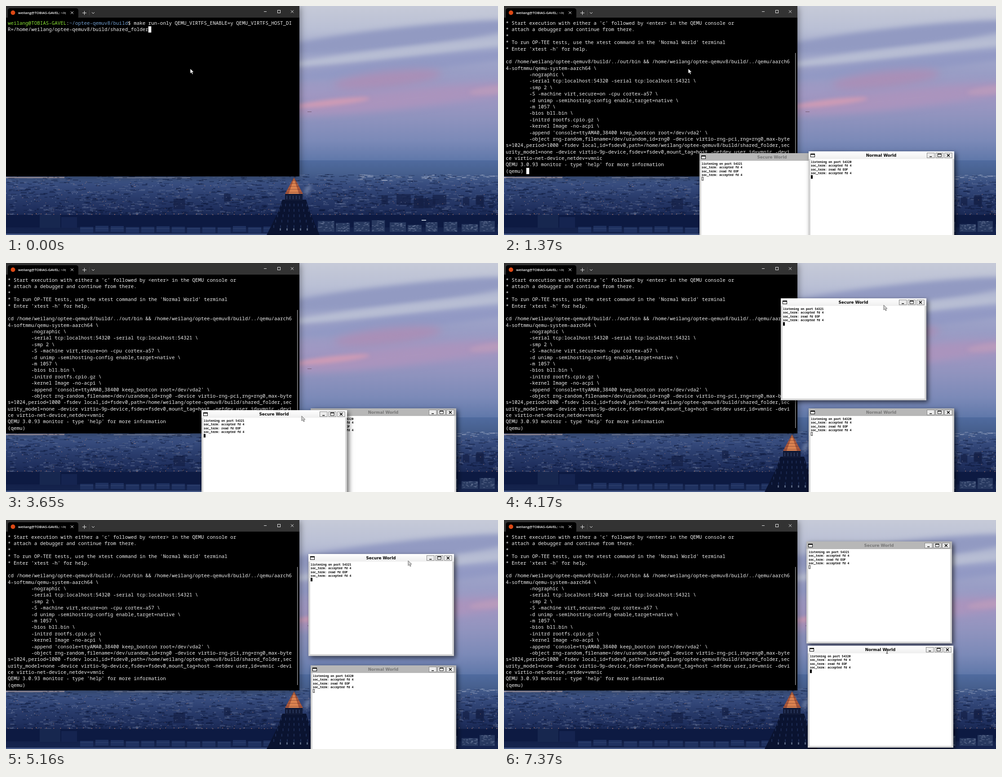
These frames come from a looping animation (1095x512 px, 8 s). An HTML page with a canvas:

```html
<!DOCTYPE html>
<html lang="en">
<head>
<meta charset="utf-8">
<title>Terminal windows</title>
<style>
  html, body { margin: 0; width: 100%; height: 100%; overflow: hidden; background: #000; }
  canvas { display: block; width: 1095px; height: 512px; }
</style>
</head>
<body>
<canvas id="stage" width="1095" height="512"></canvas>
<script>
const W = 1095, H = 512, LOOP = 8000, TICK = 140;
const ctx = document.getElementById('stage').getContext('2d');

const MONO = '10.86px "Noto Sans Mono", monospace';
const TINY = '600 6.55px "Noto Sans Mono", monospace';
const TITLE = 'bold 8.75px "DejaVu Sans", sans-serif';
const TAB = '600 7.9px "Open Sans", sans-serif';
const CELL = 6.517, ROW = 14.385;

const USER = 'weilang', HOST = 'TOBIAS-GAVEL';
const HOME = `/home/${USER}/optee-qemuv8/build`;

const OUTPUT = `* Start execution with either a 'c' followed by <enter> in the QEMU console or
* attach a debugger and continue from there.
*
* To run OP-TEE tests, use the xtest command in the 'Normal World' terminal
* Enter 'xtest -h' for help.

cd ${HOME}/../out/bin && ${HOME}/../qemu/aarch6
4-softmmu/qemu-system-aarch64 \\
        -nographic \\
        -serial tcp:localhost:54320 -serial tcp:localhost:54321 \\
        -smp 2 \\
        -S -machine virt,secure=on -cpu cortex-a57 \\
        -d unimp -semihosting-config enable,target=native \\
        -m 1057 \\
        -bios bl1.bin \\
        -initrd rootfs.cpio.gz \\
        -kernel Image -no-acpi \\
        -append 'console=ttyAMA0,38400 keep_bootcon root=/dev/vda2' \\
        -object rng-random,filename=/dev/urandom,id=rng0 -device virtio-rng-pci,rng=rng0,max-byte
s=1024,period=1000 -fsdev local,id=fsdev0,path=${HOME}/shared_folder,sec
urity_model=none -device virtio-9p-device,fsdev=fsdev0,mount_tag=host -netdev user,id=vmnic -devi
ce virtio-net-device,netdev=vmnic
QEMU 3.0.93 monitor - type 'help' for more information
(qemu)`.split('\n');

// Stacking order, front window last; the front one has the focus.
const STACK = [[0, 'T'], [400, 'TS'], [530, 'TSN'], [1650, 'SNT'], [2890, 'TNS'], [6590, 'TSN']];
const POINTER = [[0, 'arrow'], [250, 'none'], [400, 'arrow'], [2770, 'beam'], [3650, 'grey'],
  [5860, 'beam'], [6440, 'grey'], [7370, 'beam']];
const latest = (list, t) => list.findLast(k => k[0] <= t)[1];

const clamp = v => Math.min(1, Math.max(0, v));
const mix = (a, b, k) => a + (b - a) * k;

// Straight moves between key points [time, x, y], advancing once per tick.
function path(keys, t) {
  const t0 = keys[0][0], now = t0 + Math.floor((t - t0) / TICK) * TICK;
  const i = keys.findIndex(k => k[0] > now);
  if (i === 0) return keys[0].slice(1);
  if (i < 0) return keys.at(-1).slice(1);
  const [a, b] = [keys[i - 1], keys[i]], k = (now - a[0]) / (b[0] - a[0]);
  return [mix(a[1], b[1], k), mix(a[2], b[2], k)];
}
const securePos = t => path([[3760, 435, 329], [4040, 592, 83], [4180, 616, 79],
  [4740, 667, 93], [5020, 674, 89], [5160, 673, 76], [5580, 673, 48]], t + 20);

function normalPos(t) {
  const k = clamp((Math.floor((t - 6860) / 120) + 1) / 5), ease = k * k * (3 - 2 * k);
  return [mix(678, 676, ease), mix(325, 281, ease)];
}
function mousePos(t) {
  if (t < 2620) return [410, 140];
  if (t < 3900) return path([[2620, 514, 375], [3040, 548, 440], [3320, 631, 374], [3600, 658, 342]], t);
  if (t < 5860) {
    const [x, y] = securePos(t);
    return [x + mix(229, 222, clamp((t - 4170) / 990)), y + 15];
  }
  if (t < 6440) return path([[5860, 891, 246], [6140, 854, 342]], t);
  const [x, y] = normalPos(t);
  return [x + 176, y + 12];
}

function rect(c, x, y, w, h, color) {
  c.fillStyle = color;
  c.fillRect(x, y, w, h);
}
function poly(c, pts, color) {
  c.fillStyle = color;
  c.beginPath();
  pts.forEach(([x, y]) => c.lineTo(x, y));
  c.closePath();
  c.fill();
}
function disc(c, x, y, rx, ry, tilt, color) {
  c.fillStyle = color;
  c.beginPath();
  c.ellipse(x, y, rx, ry, tilt, 0, 7);
  c.fill();
}
function stroke(color, width, ...segs) {
  ctx.strokeStyle = color;
  ctx.lineWidth = width;
  ctx.beginPath();
  for (const [x1, y1, x2, y2] of segs) { ctx.moveTo(x1, y1); ctx.lineTo(x2, y2); }
  ctx.stroke();
}
function cross(x, y, r, color, width) {
  stroke(color, width, [x - r, y - r, x + r, y + r], [x + r, y - r, x - r, y + r]);
}
function text(s, x, y, font, color, align = 'left') {
  ctx.font = font;
  ctx.fillStyle = color;
  ctx.textAlign = align;
  ctx.fillText(s, x, y);
}
// Vertical gradient with evenly spaced colours.
function shade(c, y0, y1, ...colors) {
  const g = c.createLinearGradient(0, y0, 0, y1);
  colors.forEach((color, i) => g.addColorStop(i / (colors.length - 1), color));
  return g;
}
function random(seed) {
  return () => (seed = (seed * 16807) % 2147483647) / 2147483647;
}

function paintSky(c) {
  rect(c, 0, 0, W, 350, shade(c, 0, 350, '#c6cad8', '#bac0d5', '#a3aacc', '#999dc5',
    '#a097c2', '#8f93be', '#7c8ab8', '#5d76a8'));
  const cloud = (x, y, rx, ry, color, blur) => {
    c.filter = `blur(${blur}px)`;
    disc(c, x, y, rx, ry, -0.11, color);
  };
  cloud(880, 70, 290, 22, '#929ac2', 6);
  cloud(900, 102, 300, 11, '#b7bdd3', 5);
  cloud(900, 132, 300, 15, '#9299c4', 6);
  cloud(850, 164, 120, 18, '#a98fb7', 9);
  cloud(880, 209, 270, 20, '#aa94bd', 8);
  cloud(725, 216, 85, 7, '#cd9bb5', 4);
  cloud(1085, 188, 55, 9, '#b79abc', 4);
  c.filter = 'none';
  rect(c, 671, 236, 9, 1, '#6f5871');
}

function paintCity(c) {
  const rnd = random(71);
  rect(c, 0, 345, W, 167, shade(c, 345, 512, '#506b9f', '#47608f', '#364b7d', '#293b6b',
    '#1e2e5c', '#111e46', '#16254f'));
  rect(c, 0, 382, 130, 3, '#a29aaa');
  rect(c, 240, 383, 170, 2, '#7f89a6');

  // Rooftops, then windows; both grow and darken towards the viewer.
  for (let i = 0; i < 1500; i++) {
    const near = rnd(), y = 376 + near * 90;
    const color = rnd() < 0.6 ? 'rgba(10,20,54,.45)' : 'rgba(120,132,165,.3)';
    rect(c, rnd() * W, y, 2 + rnd() * 13, 1 + rnd() * (1 + 2 * near), color);
  }
  for (let i = 0; i < 60; i++) rect(c, 780 + rnd() * 310, 376 + rnd() * 14, 3 + rnd() * 12, 1.5, 'rgba(170,180,203,.5)');
  for (let i = 0; i < 12; i++) rect(c, rnd() * W, 418 + rnd() * 14, 14 + rnd() * 20, 16 + rnd() * 8, 'rgba(20,32,70,.7)');
  rect(c, 0, 467, W, 28, '#0d1a42');
  rect(c, 75, 467, 46, 29, '#17274f');
  rect(c, 123, 472, 35, 24, '#152450');

  for (let x = 165; x < 580; x += 34) {
    rect(c, x, 491 + rnd() * 4, 29, 13, '#1f3160');
    rect(c, x, 497, 29, 1, '#32446f');
  }
  for (let x = 694; x < W; x += 40) {
    const y = 478 + rnd() * 12, w = 24 + rnd() * 14;
    rect(c, x, y, w, 505 - y, '#283960');
    for (let k = 0; k < 24; k++) rect(c, x + rnd() * (w - 4), y + rnd() * (503 - y), 4, 1, 'rgba(135,148,178,.6)');
  }
  rect(c, 0, 509, 590, 3, '#465987');
  for (let i = 0; i < 320; i++) {
    const color = rnd() < 0.55 ? 'rgba(214,150,120,.7)' : 'rgba(190,200,220,.6)';
    rect(c, rnd() * W, 388 + rnd() * 78, 1 + rnd(), 1, color);
  }
  for (let x = 4; x < W; x += 9 + rnd() * 14) rect(c, x, 464 + rnd() * 2, 1.5, 1.5, '#bd8371');
  rect(c, 925, 478, 10, 2, '#b4c0cf');
}

function paintTower(c) {
  c.filter = 'blur(4px)';
  disc(c, 671, 411, 5, 13, 0.5, 'rgba(160,175,205,.55)');
  c.filter = 'none';
  poly(c, [[615, 433], [668, 433], [676, 460], [698, 512], [580, 512], [606, 460]], '#0a1330');
  rect(c, 621, 419, 39, 16, '#111a37');
  poly(c, [[641, 383], [661, 420], [621, 420]], '#a8573c');
  poly(c, [[641, 386], [652, 420], [629, 420]], '#dc8350');
  for (let k = 1; k < 6; k++) {
    rect(c, 641 - k * 3.6, 383 + k * 6.6, k * 7.2, 1, 'rgba(70,30,35,.5)');
    rect(c, 617 + k * 7, 424, 2, 8, '#29375b');
    for (let j = -3; j <= 3; j++) rect(c, 640 + j * (8 + k * 1.4), 430 + k * 12, 2, 6, '#1d2c54');
    rect(c, 594 + k * 15, 497, 3, 5, '#55627e');
  }
}

function makeBackdrop() {
  const cv = document.createElement('canvas');
  cv.width = W;
  cv.height = H;
  const c = cv.getContext('2d');
  [paintSky, paintCity, paintTower].forEach(paint => paint(c));
  return cv;
}

function shadowed(x, y, w, h, color, alpha, blur, off) {
  ctx.save();
  ctx.shadowColor = `rgba(0,0,0,${alpha})`;
  ctx.shadowBlur = blur;
  ctx.shadowOffsetX = ctx.shadowOffsetY = off;
  rect(ctx, x, y, w, h, color);
  ctx.restore();
}

function drawTabBar(t) {
  const ink = '#e8e8e8';
  rect(ctx, 0, 0, 653, 26, t < 400 ? '#2d2d2d' : '#333333');
  ctx.fillStyle = '#000';
  ctx.beginPath();
  ctx.roundRect(4, 5, 157, 24, 5);
  ctx.fill();
  disc(ctx, 15.5, 15, 5, 5, 0, '#dd4814');
  ctx.save();
  ctx.beginPath();
  ctx.rect(26, 5, 109.5, 20);
  ctx.clip();
  text(`${USER}@${HOST}: ~/c`, 27, 18, TAB, '#fff');
  ctx.restore();
  stroke('#484848', 1, [185.5, 9, 185.5, 21]);
  cross(147, 15, 3, ink, 1);
  cross(637, 12.5, 3, ink, 1);
  stroke(ink, 1, [170, 15.5, 179, 15.5], [174.5, 11, 174.5, 20], [574, 12.5, 580, 12.5],
    [191, 14, 194, 17], [194, 17, 197, 14]);
  ctx.strokeRect(604.5, 9.5, 6, 6);
}

function drawTerminal(t) {
  shadowed(0, 0, 653, 381, '#000', 0.4, 14, 2);
  drawTabBar(t);
  const line = (s, col, row, color = '#f0f0f0') => text(s, 4 + col * CELL, 42 + row * ROW, MONO, color);
  const block = (col, row) => rect(ctx, 4 + col * CELL, 31 + row * ROW, 6.5, 14, '#fff');
  if (t < 1370) {
    line(`${USER}@${HOST}`, 0, 0, '#8ae234');
    line(':', 20, 0);
    line('~/optee-qemuv8/build', 21, 0, '#729fcf');
    line('$ make run-only QEMU_VIRTFS_ENABLE=y QEMU_VIRTFS_HOST_DI', 41, 0);
    line(`R=${HOME}/shared_folder`, 0, 1);
    if (t < 250) block(48, 1); else block(0, 2);
  } else {
    OUTPUT.forEach((s, i) => line(s, 0, i));
    if (t < 1650) block(7, 23);
    rect(ctx, 648, 105, 1.3, 264, '#a0a0a0');
  }
}

function drawButton(x, y, kind) {
  const m = x + 8.7;
  rect(ctx, x, y, 17.5, 12, '#858585');
  rect(ctx, x + 1, y + 1, 15.5, 10, '#ececec');
  if (kind === 'min') rect(ctx, m - 2.5, y + 8, 5, 1.5, '#000');
  if (kind === 'max') {
    rect(ctx, m - 4.5, y + 2, 9, 7.5, '#111');
    rect(ctx, m - 3.5, y + 4, 7, 4.5, '#ececec');
  }
  if (kind === 'close') cross(m, y + 6, 3, '#000', 1.6);
}

function drawXterm(name, port, [x, y], active, ready) {
  shadowed(x, y, 324, 228, '#c9c9c9', 0.6, 10, 4);
  rect(ctx, x + 1, y + 1, 322, 226, '#d6d6d6');
  rect(ctx, x, y, 324, 17, active ? shade(ctx, y, y + 17, '#fff', '#eee') : '#b7b7b7');
  rect(ctx, x + 4, y + 17, 316, 207, '#fff');
  text(name, x + 161.5, y + 11.7, TITLE, active ? '#000' : '#777', 'center');
  rect(ctx, x + 4, y + 5, 10, 8, '#000');
  rect(ctx, x + 5, y + 7.5, 8, 4.5, '#fff');
  ['min', 'max', 'close'].forEach((kind, i) => drawButton(x + 263 + i * 19.6, y + 3, kind));

  const log = [`listening on port ${port}`];
  if (ready) log.push('soc_term: accepted fd 4', 'soc_term: read fd EOF', 'soc_term: accepted fd 4');
  log.forEach((s, i) => text(s, x + 5, y + 25.7 + i * 8.55, TINY, '#000'));
  const cy = y + 19 + log.length * 8.55;
  rect(ctx, x + 5, cy, 4, 8, '#000');
  if (!active) rect(ctx, x + 5.8, cy + 0.8, 2.4, 6.4, '#fff');
}

function drawMouse([x, y], kind) {
  if (kind === 'none') return;
  if (kind === 'beam') {
    stroke('#222', 1, [x + 0.5, y - 4, x + 0.5, y + 5], [x - 2, y - 4.5, x + 3, y - 4.5], [x - 2, y + 5, x + 3, y + 5]);
    return;
  }
  const shape = [[0, 0], [0, 11], [2.6, 8.7], [4.4, 12.8], [6.3, 12], [4.6, 8], [8, 7.8]];
  poly(ctx, shape.map(([a, b]) => [x + a, y + b]), kind === 'grey' ? '#d2d2d2' : '#fff');
  ctx.strokeStyle = kind === 'grey' ? '#555' : '#111';
  ctx.lineWidth = 0.8;
  ctx.stroke();
}

const backdrop = makeBackdrop();

function draw(t) {
  ctx.drawImage(backdrop, 0, 0);
  const order = latest(STACK, t), front = order.at(-1), ready = t >= 1370;
  for (const w of order) {
    if (w === 'T') drawTerminal(t);
    if (w === 'S') drawXterm('Secure World', 54321, securePos(t).map(Math.round), front === 'S', ready);
    if (w === 'N') drawXterm('Normal World', 54320, normalPos(t).map(Math.round), front === 'N', ready);
  }
  drawMouse(mousePos(t).map(Math.round), latest(POINTER, t));
}

const start = performance.now();
function frame(now) {
  draw(Math.max(0, now - start) % LOOP);
  requestAnimationFrame(frame);
}
requestAnimationFrame(frame);
</script>
</body>
</html>
```
